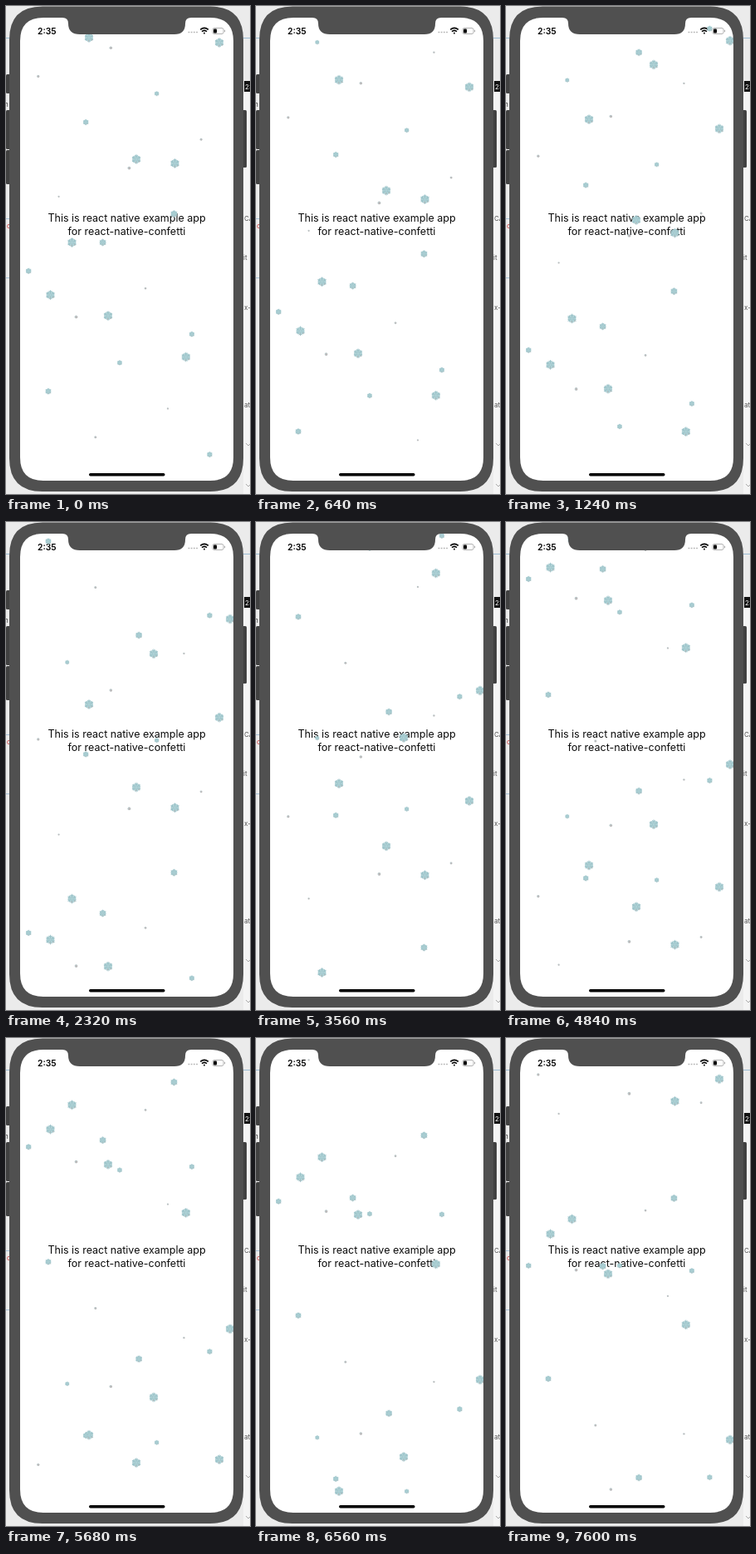
These frames come from a looping animation (294 px wide and 586 px high, 7.64 s). An HTML page:

```html
<!DOCTYPE html>
<html lang="en">
<head>
<meta charset="utf-8">
<title>Falling snow in a phone</title>
<style>
html, body { margin: 0; width: 100%; height: 100%; overflow: hidden; background: #ebebeb; }
svg { display: block; width: 294px; height: 586px; font-family: Inter, Roboto, sans-serif; }
.title { font-size: 12.5px; text-anchor: middle; fill: #0c0c0c; }
.side { font-size: 8px; fill: #555; }
</style>
</head>
<body>
<svg viewBox="0 0 294 586">
  <defs>
    <g id="flake">
      <circle r=".8" fill="#afd2d6"/>
      <g id="arms" fill="none" stroke="#9cc3c9" stroke-width=".16"></g>
      <path d="M.45 .4L.7 .55M-.1 .5L-.05 .8" stroke="#c4b4b1" stroke-width=".14"/>
    </g>
    <g id="speck"><circle r=".9" fill="#b9c6c8"/><circle cx=".2" cy=".2" r=".5" fill="#c0b6b6"/></g>
    <clipPath id="screen"><rect x="17" y="13" width="257" height="557"/></clipPath>
  </defs>

  <!-- desktop behind the phone -->
  <rect width="294" height="586" fill="#ebebeb"/>
  <rect x="286" y="103" width="8" height="483" fill="#f4f4f4"/>
  <path d="M0 38.5H6M286 38.5H294" stroke="#9dbdd4"/>
  <path d="M0 255.5H6M0 326.5H6" stroke="#a9c4da"/>
  <rect x="287" y="90" width="7" height="13" fill="#111"/>
  <text x="288" y="100" font-size="8" fill="#fff">2:</text>
  <g class="side">
    <text x="-2" y="121" fill="#333">n</text>
    <text x="1" y="267" fill="#c33">c</text>
    <text x="287" y="258">CA</text>
    <text x="286" y="305">it</text>
    <text x="287" y="365">x-</text>
    <text x="287" y="482">at</text>
  </g>
  <path d="M289 525l3 3 3-3M289 574l3 3 3-3" fill="none" stroke="#aaa"/>

  <!-- side buttons -->
  <g fill="#414141">
    <rect y="82" width="6" height="23" rx="1.5"/>
    <rect y="125" width="6" height="47" rx="1.5"/>
    <rect y="173" width="6" height="41" rx="1.5"/>
    <rect x="284" y="125" width="6" height="69" rx="1.5"/>
  </g>

  <rect x="15" y="12" width="261" height="560" rx="30" fill="#fff"/>
  <text class="title" x="145.5" y="258.5">This is react native example app</text>
  <text class="title" x="145.5" y="274.7">for react-native-confetti</text>

  <text x="38" y="33.6" font-size="10.3" font-weight="600">2:35</text>
  <path d="M219.5 31.5H231" stroke="#b5b5b5" stroke-width="1.6" stroke-dasharray="1.8 1.4"/>
  <path d="M234.2 28.4q4.8-4.2 9.6 0M236 30.6q3-2.6 6 0M238.9 31.8v1.6" fill="none" stroke="#000" stroke-width="1.6"/>
  <rect x="249" y="26.5" width="13" height="7" rx="2" fill="#fff" stroke="#aaa" stroke-width=".9"/>
  <rect x="250" y="27.6" width="4" height="4.8" rx="1"/>
  <path d="M263.6 28.8v2.4" stroke="#aaa"/>

  <g id="snow" clip-path="url(#screen)"></g>

  <path fill="#505050" fill-rule="evenodd"
    d="M44 .5H246Q286 .5 286 40.5V543Q286 583 246 583H44Q4 583 4 543V40.5Q4 .5 44 .5Z
       M68 14q7 0 7 7q0 13 14 13H203q13 0 13-13q0-7 7-7H246q28 0 28 28V542q0 28-28 28H45q-28 0-28-28V42q0-28 28-28Z"/>
  <rect x="100" y="561" width="91.5" height="3.4" rx="1.7"/>
</svg>
<script>
const LOOP = 7640, STEP = 40, TOP = -60, BOTTOM = 552, FALL = BOTTOM - TOP;

let seed = 7;
const random = (min, max) => {
  seed = seed * 16807 % 2147483647;
  return min + (max - min) * seed / 2147483647;
};

// the largest flakes: x, starting y, speed in px/s
const flakes = [
  [53.5, 347, 65.5], [79.5, 284, 71.4], [100, 38, 76.7], [123, 372, 68.5], [157, 184, 57],
  [178, -33.6, 81.3], [203.5, 189, 65.3], [216.8, 421.5, 70], [257, 44, 80.8], [270, -47, 69.3]
].map(([x, y, speed]) => ({ x, y, speed, r: 5.8 }));

// smaller flakes and specks alternate across the screen, spread evenly in height
const SMALL = 22;
for (let i = 0; i < SMALL; i++) flakes.push({
  x: 18 + 229 * i / (SMALL - 1) + random(-3, 3),
  y: TOP + FALL * (i * .618 % 1),
  speed: random(56, 81),
  r: i % 2 ? random(2.7, 4.6) : random(.7, 2.2)
});

const add = (parent, name, attrs) => {
  const el = document.createElementNS("http://www.w3.org/2000/svg", name);
  for (const key in attrs) el.setAttribute(key, attrs[key]);
  return parent.appendChild(el);
};

const arms = document.getElementById("arms");
for (let a = 30; a < 390; a += 60)
  add(arms, "path", { d: "M.2 0H1M.55 0L.84 .3M.55 0L.84-.3", transform: `rotate(${a})` });

const snow = document.getElementById("snow");
for (const f of flakes) f.node = add(snow, "use", { href: f.r > 2.4 ? "#flake" : "#speck" });

function draw(now) {
  const t = Math.floor(now % LOOP / STEP) * STEP / 1000;
  // the fall runs slightly ahead at the start of the loop
  const fallTime = t + .04 * Math.min(1, t / 1.24);
  for (const { x, y, speed, r, node } of flakes) {
    const drop = (y - TOP + speed * fallTime) % FALL + TOP;
    node.setAttribute("transform", `translate(${x} ${drop}) scale(${r})`);
  }
  requestAnimationFrame(draw);
}
draw(0);
</script>
</body>
</html>
```
